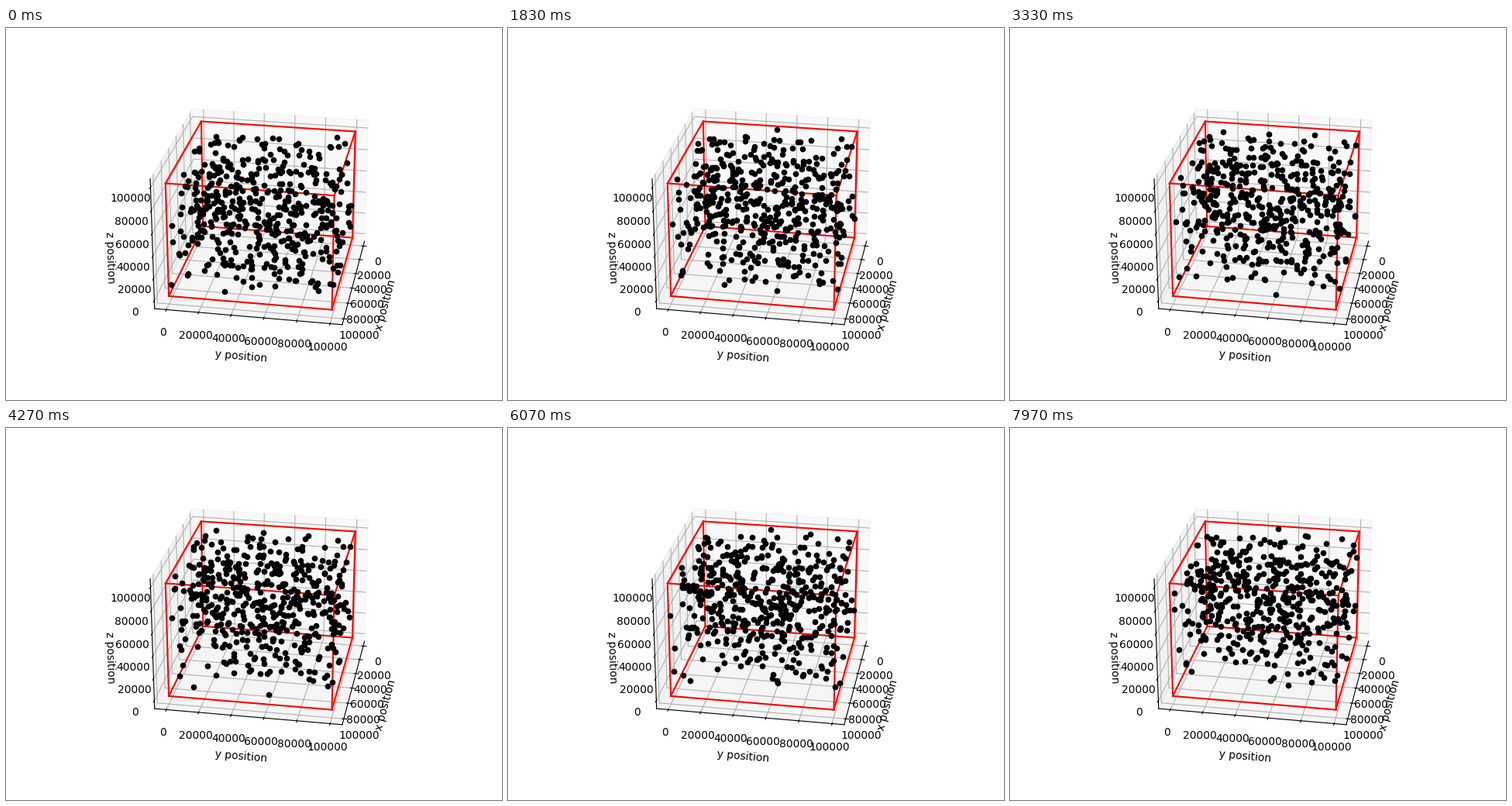
A matplotlib script that plays this animation: 640 px wide and 480 px high, repeating every 8 s.

```python
from itertools import combinations, product

import matplotlib.pyplot as plt
import numpy as np
from matplotlib.animation import FuncAnimation

SIDE = 100000
COUNT = 480
FRAMES = 240
LOOP_MS = 8000
STEP = 0.0045  # spread of one random step, in box sides
RISE = 0.35    # how far the cloud leans upwards by the end


def make_paths():
    """Random walks inside the box, drifting slowly towards the top."""
    rng = np.random.default_rng(4)
    steps = rng.normal(0, STEP, (FRAMES, COUNT, 3))
    steps[0] = rng.random((COUNT, 3))
    pos = np.cumsum(steps, axis=0)
    pos = 1 - np.abs(1 - pos % 2)  # bounce off the walls
    t = np.linspace(0, 1, FRAMES)[:, None]
    pos[:, :, 2] **= 1 - RISE * np.sqrt(t)
    return pos * SIDE


def draw_box(ax):
    for a, b in combinations(product((0, SIDE), repeat=3), 2):
        if sum(p != q for p, q in zip(a, b)) == 1:
            ax.plot(*zip(a, b), color="red", lw=1.5)


paths = make_paths()

fig = plt.figure(figsize=(6.4, 4.8), dpi=100)
ax = fig.add_subplot(projection="3d")
ax.view_init(elev=25, azim=10)
ax.margins(0.05, 0.05, 0.05)
draw_box(ax)
dots, = ax.plot(*paths[0].T, "ko", markersize=4.5, zorder=3)
ax.set_xlabel("x position")
ax.set_ylabel("y position")
ax.set_zlabel("z position")


def update(i):
    dots.set_data_3d(*paths[i].T)
    return dots,


anim = FuncAnimation(fig, update, frames=FRAMES, interval=LOOP_MS / FRAMES,
                     repeat=True, repeat_delay=0, blit=False)
plt.show()
```
